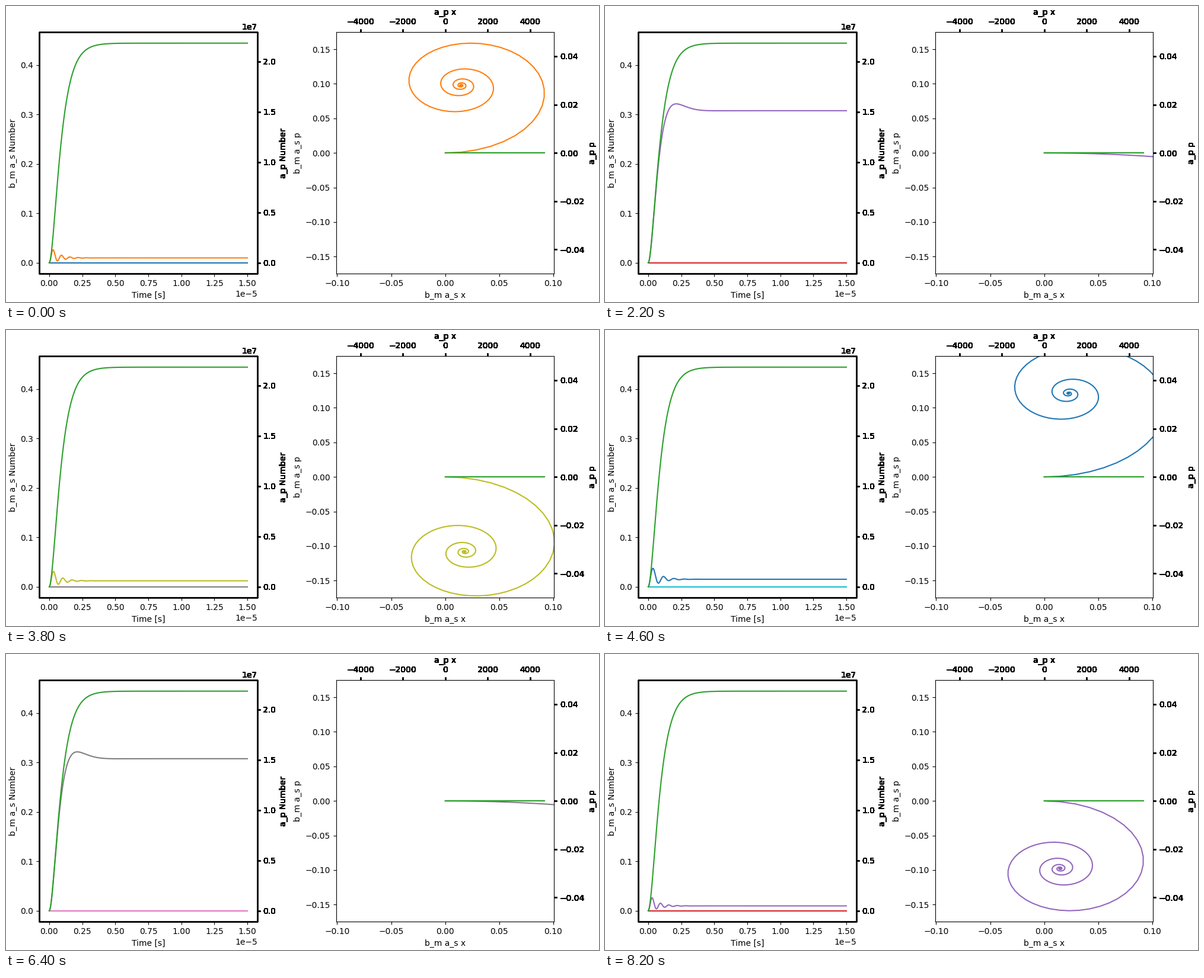
A matplotlib script that plays this animation: 1000x500 px, repeating every 8400 ms.

```python
import numpy as np
import matplotlib.pyplot as plt
from matplotlib.animation import FuncAnimation

W, H, DPI = 1000, 500, 100
FRAMES, STEP_MS = 42, 200
SWEEP = 21                # detuning steps per sweep, run twice per loop
DECAY, DRIVE = 1.5e6, 1e6
PUMP_NUMBER = 2.184e7
LAYERS = 42               # stacked copies of the secondary axes

t = np.linspace(0, 15e-6, 1001)


def amplitude(detuning):
    """Driven, damped mode that starts empty."""
    rate = DECAY - 1j * detuning
    return DRIVE / rate * (1 - np.exp(-rate * t))


def detuning(n):
    return 1e7 - 1e6 * (n % SWEEP)


def number(a):
    return np.abs(a) ** 2


def stack(img, dpi):
    """Darken soft edges as if the ink were printed LAYERS times."""
    out = np.zeros_like(img)
    out[..., 3] = 1 - (1 - img[..., 3]) ** LAYERS
    return out, 0, 0


def box(left, top, width, height):
    return [left / W, 1 - (top + height) / H, width / W, height / H]


fig = plt.figure(figsize=(W / DPI, H / DPI), dpi=DPI)
left_box = box(56.2, 44.2, 367.5, 408)
right_box = box(556.8, 44.2, 367.5, 408)

# Mode numbers over time
resonant = amplitude(0)
peak = number(DRIVE / DECAY)
margin = np.array([-0.05, 1.05])

ax_num = fig.add_axes(left_box)
ax_num.set(xlim=margin * t[-1], ylim=margin * peak,
           xlabel="Time [s]", ylabel="b_m a_s Number")
ax_pump = ax_num.twinx()
ax_pump.set(ylim=margin * PUMP_NUMBER, ylabel="a_p Number")

# Phase space
widest = amplitude(detuning(0))
x_max = np.abs(widest.real).max()
p_max = np.abs(widest.imag).max()
sides = np.array([-1.1, 1.1])

ax_phase = fig.add_axes(right_box)
ax_phase.set(xlim=sides * x_max, ylim=sides * p_max,
             xlabel="b_m a_s x", ylabel="b_m a_s p")
ax_pp = fig.add_axes(right_box, frameon=False)
ax_pp.set(xlim=sides * np.sqrt(PUMP_NUMBER), ylim=(-0.05, 0.05),
          xlabel="a_p x", ylabel="a_p p")
ax_pp.xaxis.tick_top()
ax_pp.yaxis.tick_right()
ax_pp.xaxis.set_label_position("top")
ax_pp.yaxis.set_label_position("right")

for ax in (ax_pump, ax_pp):
    ax.set_agg_filter(stack)

empty, = ax_num.plot(t, 0 * t)
signal, = ax_num.plot(t, 0 * t)
spiral, = ax_phase.plot([], [])

# The pump fills its own axes, so it is drawn scaled to the main ones
ax_num.plot(t, number(resonant), color="C2")
ax_phase.plot(resonant.real / resonant.real.max() * x_max, 0 * t, color="C2")


def update(n):
    a = amplitude(detuning(n))
    empty.set_color(f"C{3 * n % 10}")
    signal.set_ydata(number(a))
    spiral.set_data(a.real, a.imag)
    for line in (signal, spiral):
        line.set_color(f"C{(3 * n + 1) % 10}")
    return empty, signal, spiral


anim = FuncAnimation(fig, update, frames=FRAMES, interval=STEP_MS,
                     repeat=True, repeat_delay=0)
plt.show()
```
